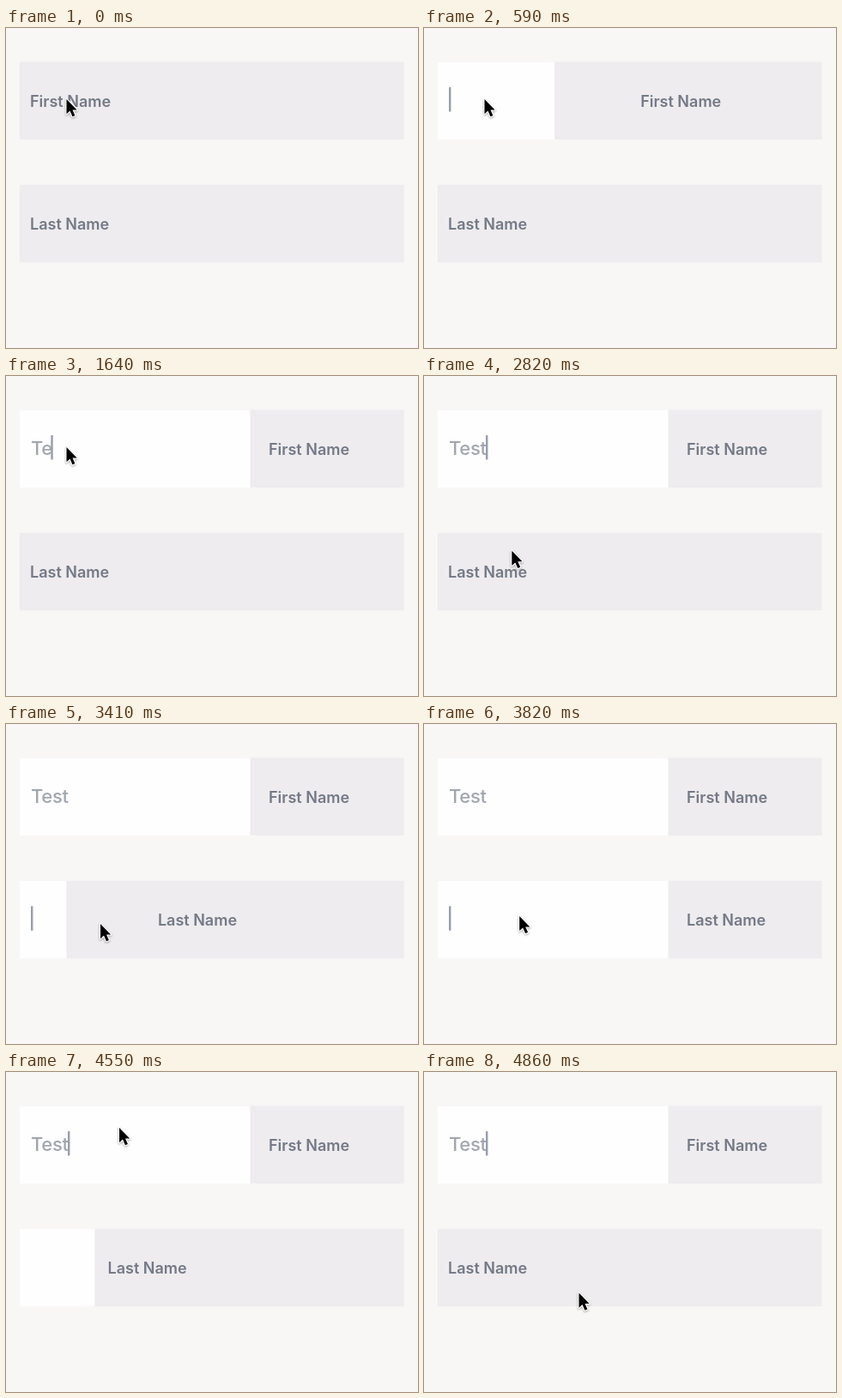
Write an HTML page that moves like this. It is 480 px wide and 373 px high and loops after 4.9 s.

```html
<!DOCTYPE html>
<html lang="en">
<head>
<meta charset="utf-8">
<title>Sliding labels</title>
<style>
  html, body { margin: 0; width: 100%; height: 100%; overflow: hidden; background: #f8f7f5; }
  svg { display: block; width: 480px; height: 373px; font-family: Inter, "Open Sans", sans-serif; }
  .box { fill: #eeecee; }
  .open { fill: #fefeff; }
  .label { font-size: 18px; font-weight: 600; fill: #747987; }
  .value { font-size: 22px; font-weight: 500; letter-spacing: -.3px; fill: #a1a6af; }
  .caret { fill: #979dab; }
  #pointer { stroke: #fff; stroke-width: 2.4; paint-order: stroke; stroke-linejoin: round;
    filter: drop-shadow(0 1px 1px #0005); }
</style>
</head>
<body>
<svg viewBox="0 0 480 373">
  <g id="fields"></g>
  <path id="pointer" d="M0 0V17.2L4 13.6L6.9 20.2L9.9 18.9L7 12.5H12.2Z"/>
</svg>
<script>
const LOOP = 4900;
const OPEN_WIDTH = 268.5, LABEL_X = 28, LABEL_SHIFT = 278;
const WORD = "Test";
const KEY_TIMES = [1450, 1640, 1950, 2270];
const CARET_X = [29, 42, 52.3, 64.5, 72];

const clamp = v => Math.min(1, Math.max(0, v));
const mix = (a, b, p) => a + (b - a) * p;

// Cubic Bézier easing, solved for x by bisection
function bezier(x1, y1, x2, y2) {
  const at = (a, b, s) => 3 * a * s * (1 - s) ** 2 + 3 * b * s * s * (1 - s) + s ** 3;
  return x => {
    let lo = 0, hi = 1;
    for (let i = 0; i < 20; i++) {
      const mid = (lo + hi) / 2;
      if (at(x1, x2, mid) < x) lo = mid; else hi = mid;
    }
    return at(y1, y2, hi);
  };
}
const ease = bezier(.25, .1, .25, 1);
const easeInOut = bezier(.42, 0, .58, 1);
const progress = (t, start, length, curve = v => v) => {
  const u = clamp((t - start) / length);
  return u > 0 && u < 1 ? curve(u) : u;
};

function makeField(y, name) {
  const g = document.createElementNS("http://www.w3.org/2000/svg", "g");
  g.setAttribute("transform", `translate(0 ${y})`);
  g.innerHTML = `<rect class="box" x="16" width="447.5" height="90.5"/>
    <rect class="open" x="16" height="90.5"/>
    <text class="label" y="52">${name}</text>
    <text class="value" x="29" y="52"></text>
    <rect class="caret" y="29.5" width="2.4" height="28.5" rx=".6"/>`;
  document.getElementById("fields").append(g);
  const [, open, label, value, caret] = g.children;
  return (edge, shift, typed, caretAlpha) => {
    open.setAttribute("width", edge * OPEN_WIDTH);
    label.setAttribute("x", LABEL_X + shift * LABEL_SHIFT);
    value.textContent = WORD.slice(0, typed);
    caret.setAttribute("x", CARET_X[typed]);
    caret.setAttribute("opacity", caretAlpha);
  };
}

const drawFirst = makeField(39.5, "First Name");
const drawLast = makeField(182.8, "Last Name");
const pointer = document.getElementById("pointer");

// Pointer moves: start, duration, destination
const MOVES = [
  [2670, 300, 110, 233],
  [3800, 300, 132, 65],
  [4600, 250, 180.5, 257.5],
];

function pointerAt(t) {
  let x = 70.5, y = 83;
  for (const [start, length, toX, toY] of MOVES) {
    const p = progress(t, start, length, ease);
    x = mix(x, toX, p);
    y = mix(y, toY, p);
  }
  return [x, y];
}

// A caret appears at once and fades out
const caretAlpha = (t, on, off) => t < on ? 0 : 1 - progress(t, off, 100);

function draw(t) {
  const typed = KEY_TIMES.filter(k => t >= k).length;
  const caret = t < 1450 ? caretAlpha(t, 490, 1310)
    : t < 4400 ? caretAlpha(t, 1450, 2950) : 1;
  drawFirst(progress(t, 465, 250, easeInOut), progress(t, 465, 250, ease), typed, caret);

  const closing = progress(t, 4400, 250, easeInOut);
  drawLast(progress(t, 3330, 260, easeInOut) - closing,
    progress(t, 3330, 260, ease) - closing, 0, caretAlpha(t, 3355, 4040));

  pointer.setAttribute("transform", `translate(${pointerAt(t)})`);
}

function frame(now) {
  draw(now % LOOP);
  requestAnimationFrame(frame);
}
draw(0);
requestAnimationFrame(frame);
</script>
</body>
</html>
```
